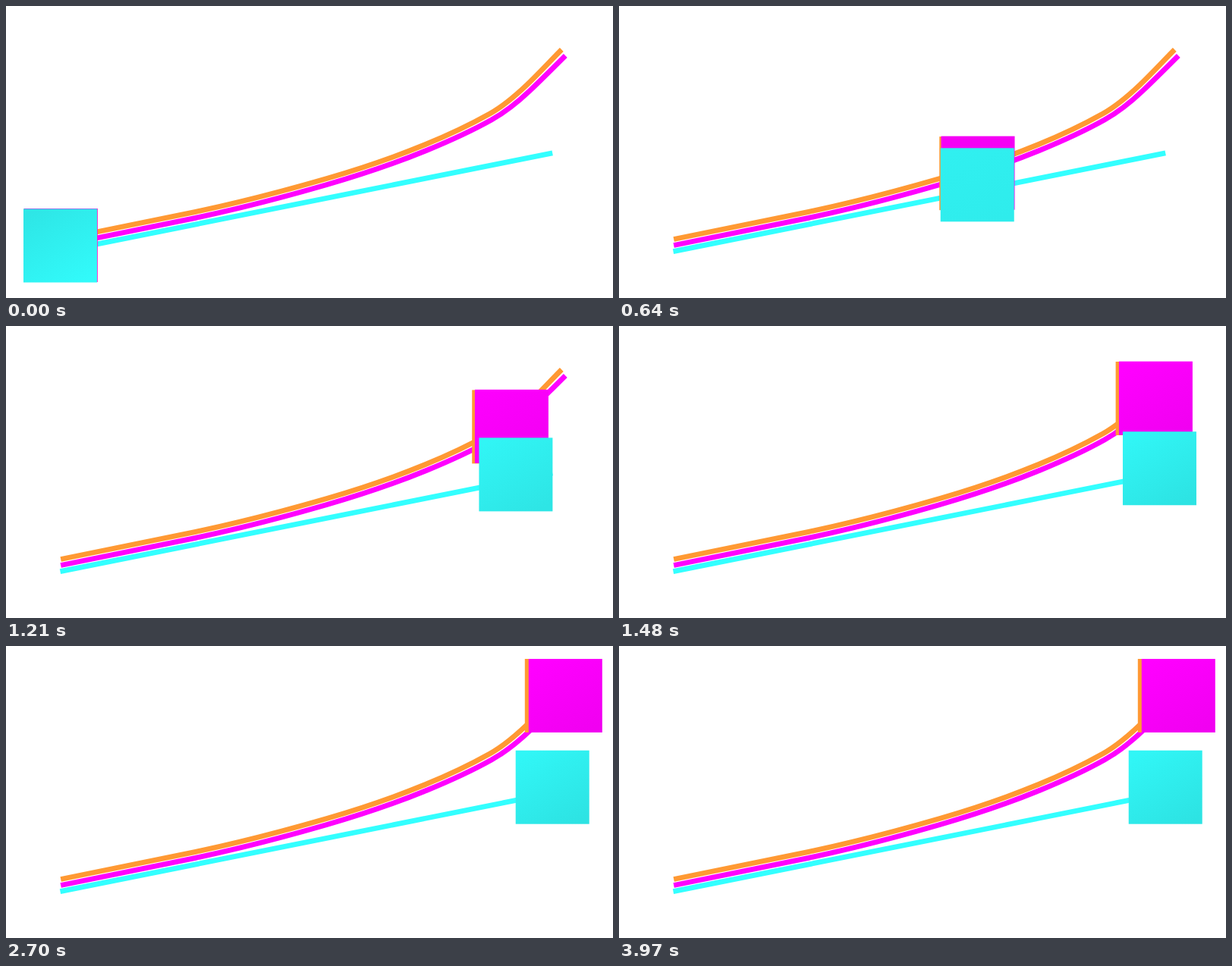
These frames come from a looping animation (800x385 px, 4.03 s). An HTML page:

```html
<!DOCTYPE html>
<html lang="en">
<head>
<meta charset="utf-8">
<title>Boxes on tracks</title>
<style>
  html, body { margin: 0; width: 100%; height: 100%; overflow: hidden; background: #fff; }
  svg { display: block; width: 800px; height: 385px; }
  .track { fill: none; stroke-width: 6.8; }
</style>
</head>
<body>
<svg viewBox="0 0 800 385">
  <defs>
    <linearGradient id="cyanFill" x1="0.2" y1="0" x2="0.8" y2="1">
      <stop offset="0"/><stop offset="1"/>
    </linearGradient>
    <linearGradient id="magentaFill" x1="0.2" y1="0" x2="0.8" y2="1">
      <stop offset="0"/><stop offset="1"/>
    </linearGradient>
  </defs>
  <g id="tracks"></g>
  <g id="boxes"></g>
</svg>
<script>
const LOOP = 4030, STEP = 1000 / 33, SIZE = 97;
const NS = 'http://www.w3.org/2000/svg';

// Knots of a smooth curve: x, y, slope.
const bend = [
  [72.2, 315.5, -0.2], [250, 279.3, -0.21], [423, 235.5, -0.29], [554, 190.5, -0.41],
  [640, 150, -0.56], [690, 112, -0.95], [737.3, 65.5, -1]
];
const shifts = [0, 0, -0.3, -1.1, -2.3, -3.5, -5];
const leaning = bend.map(([x, y, m], i) => [x + shifts[i], y, m]);

function curve(knots) {
  let d = `M${knots[0][0]} ${knots[0][1]}`;
  for (let i = 1; i < knots.length; i++) {
    const [x0, y0, m0] = knots[i - 1], [x1, y1, m1] = knots[i];
    const h = (x1 - x0) / 3;
    d += `C${x0 + h} ${y0 + h * m0} ${x1 - h} ${y1 - h * m1} ${x1} ${y1}`;
  }
  return d;
}

function add(parent, tag, attrs) {
  const el = document.createElementNS(NS, tag);
  for (const key in attrs) el.setAttribute(key, attrs[key]);
  return document.getElementById(parent).appendChild(el);
}

// lift moves only the drawn track, not the route of the box.
const movers = [
  { d: curve(leaning), color: '#ff9933', fill: '#ff9933', lift: -8, time: 2130, power: 2.38 },
  { d: curve(bend), color: '#ff00ff', fill: 'url(#magentaFill)', lift: 0, time: 2130, power: 2.38 },
  { d: 'M71.5 316L720.2 186.2', color: '#33ffff', fill: 'url(#cyanFill)', lift: 7.6, time: 1667, power: 2 }
];

for (const m of movers) {
  m.track = add('tracks', 'path', {
    d: m.d, class: 'track', stroke: m.color, transform: `translate(0 ${m.lift})`
  });
  m.box = add('boxes', 'rect', { width: SIZE, height: SIZE, fill: m.fill });
  m.length = m.track.getTotalLength();
}

const easeOut = (t, time, power) => 1 - Math.pow(1 - Math.min(t / time, 1), power);
const mix = (a, b, p) => a + (b - a) * p;

function shade(id, rgb, ...levels) {
  document.querySelectorAll(`#${id} stop`).forEach((stop, i) => {
    stop.setAttribute('stop-color', `rgb(${rgb.map(c => Math.round(c * levels[i])).join()})`);
  });
}

function draw(ms) {
  const tick = Math.floor((Math.floor(ms / 10) * 10 + 5) / STEP);
  const t = tick * STEP;
  for (const m of movers) {
    m.p = easeOut(t, m.time, m.power);
    const c = m.track.getPointAtLength(m.p * m.length);
    m.box.setAttribute('x', c.x - SIZE / 2);
    m.box.setAttribute('y', c.y - SIZE / 2);
  }
  const p = movers[2].p;
  shade('cyanFill', [51, 255, 255], mix(0.9, 0.965, p), mix(0.98, 0.89, p));
  shade('magentaFill', [255, 0, 255], mix(0.9, 1, p), mix(0.98, 0.945, p));
}

const start = performance.now();
function frame() {
  draw((performance.now() - start) % LOOP);
  requestAnimationFrame(frame);
}
frame();
</script>
</body>
</html>
```
